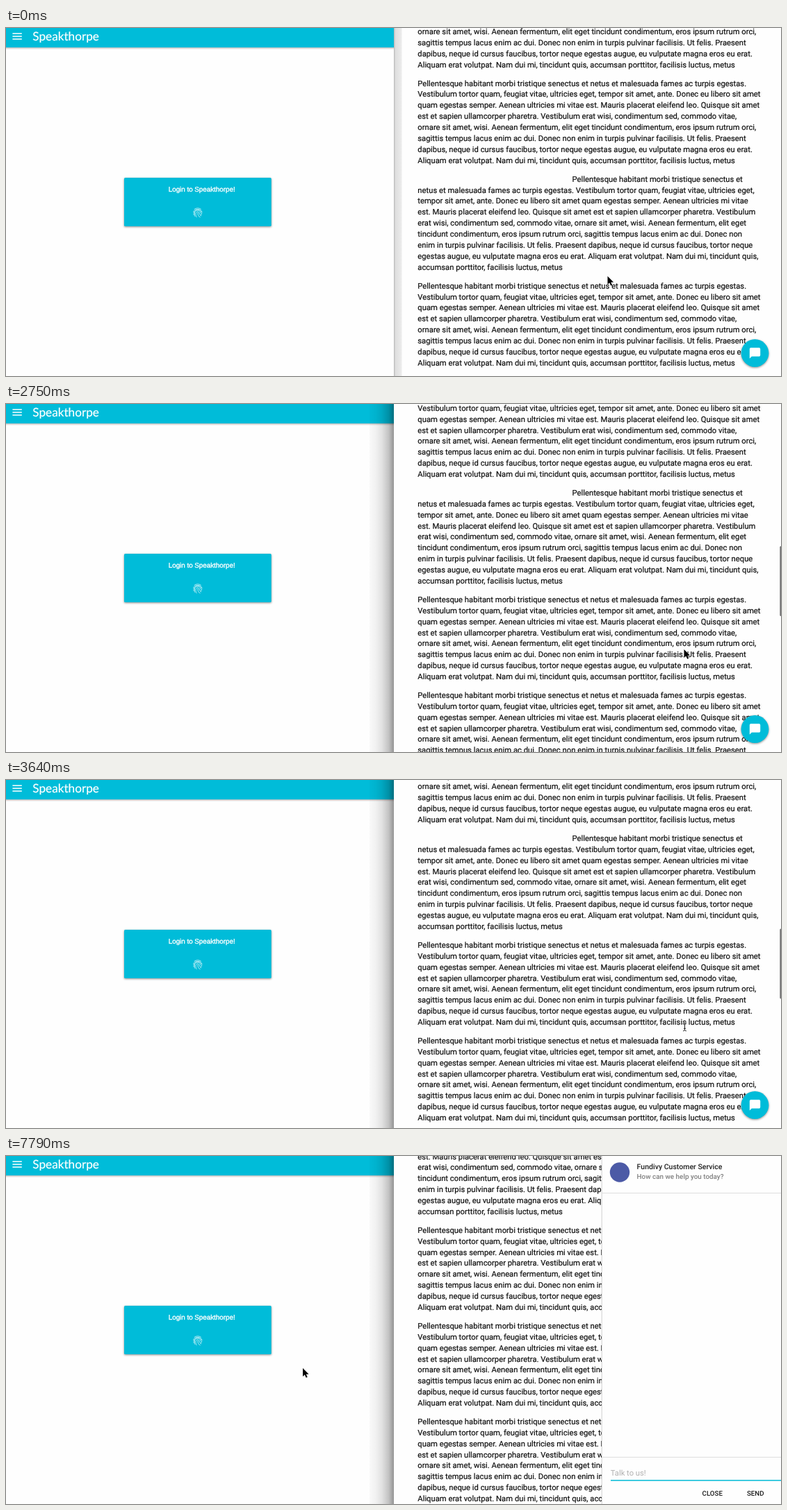
An HTML page that plays this animation: 1115x502 px, repeating every 8000 ms.

```html
<!DOCTYPE html>
<html lang="en">
<head>
<meta charset="utf-8">
<title>Support chat</title>
<style>
  html, body { margin: 0; width: 100%; height: 100%; overflow: hidden; background: #fefefe; }
  svg { display: block; width: 100%; height: 100%; text-rendering: geometricPrecision; }
  text { font-family: Roboto, sans-serif; white-space: pre; }
  .body { font-size: 11.27px; fill: #111; stroke: #111; stroke-width: .2px; }
  .action { font-size: 9.7px; font-weight: 500; fill: #1c1c1c; }
  .card { filter: drop-shadow(0 1.3px 1.7px rgba(0, 0, 0, .46)); }
</style>
</head>
<body>
<svg viewBox="0 0 1115 502" xmlns="http://www.w3.org/2000/svg">
  <defs>
    <linearGradient id="barShade" x2="0" y2="1">
      <stop stop-opacity=".26"/><stop offset="1" stop-opacity="0"/>
    </linearGradient>
    <linearGradient id="windowShade">
      <stop stop-opacity=".02"/><stop offset=".25" stop-opacity=".05"/>
      <stop offset=".5" stop-opacity=".11"/><stop offset=".78" stop-opacity=".23"/>
      <stop offset="1" stop-opacity=".42"/>
    </linearGradient>
    <linearGradient id="edgeShade">
      <stop stop-color="#b8b8b8"/><stop offset=".2" stop-color="#dedede"/>
      <stop offset="1" stop-color="#ececec"/>
    </linearGradient>
    <g id="plain" class="body"></g>
    <g id="indented" class="body"></g>
  </defs>

  <rect width="1115" height="502" fill="#fefefe"/>

  <!-- app window -->
  <rect width="558" height="28" fill="#00bcd9"/>
  <rect y="28" width="558" height="3" fill="url(#barShade)"/>
  <path d="M9.4 8h13.4M9.4 12h13.4M9.4 16h13.4" stroke="#fff" stroke-width="1.4"/>
  <text x="38.3" y="17.6" font-size="17.2" fill="#fff" stroke="#fff" stroke-width=".2" style="font-family:Lato,sans-serif">Speakthorpe</text>
  <rect class="card" x="170" y="216" width="211.7" height="70" rx="1.5" fill="#00bcd9"/>
  <text x="281.7" y="236" font-size="9.8" fill="#fff" stroke="#fff" stroke-width=".35" text-anchor="middle" style="font-family:'Liberation Sans',Arial,sans-serif">Login to Speakthorpe!</text>
  <g transform="translate(275.8 266.4)" fill="none" stroke="#fff" stroke-width=".8" stroke-linecap="round" opacity=".8">
    <path d="M-4.6-5.2Q0-8.2 4.6-5.2M-6.2-1C-5-6.6 5-6.6 6.2-1M-5.6 3.2C-7.4-5.4 6-6.6 5.8 1.4Q5.6 3 4.2 3"/>
    <path d="M-4 5.2C-6-2.8-2-3.6 0-3.5 2.6-3.4 4-1.6 4 .6M-1.8 6.4C-3.6 2-3-1.4 0-1.5 3-1.4 1.2 3.6 5 4.4M0 .2C0 3.6 1.4 5.8 3.4 6.4"/>
  </g>

  <rect id="edge" x="558" width="11.5" height="502" fill="url(#edgeShade)"/>
  <rect id="shade" x="523" width="35" height="502" fill="url(#windowShade)"/>

  <!-- page window -->
  <g id="page"></g>
  <rect id="thumb" x="1113.4" width="3" height="101" rx="1.5" fill="#6c6c6c"/>
  <g id="fab">
    <circle class="card" cx="1077.5" cy="469" r="19.9" fill="#00bcd9"/>
    <circle id="glow" cx="1077.5" cy="469" r="19.9" fill="#fff"/>
    <path transform="translate(1068.3 459.8) scale(.77)" fill="#fff" d="M20 2H4a2 2 0 0 0-2 2v18l4-4h14a2 2 0 0 0 2-2V4a2 2 0 0 0-2-2z"/>
  </g>

  <!-- chat drawer -->
  <g id="drawer">
    <rect x="856" width="2" height="502" fill="#000" opacity=".06"/>
    <rect x="857.5" width="280" height="502" fill="#fefefe"/>
    <path d="M857.5 0V502M858 53.5h280M858 434.5h280" stroke="#dedede"/>
    <circle cx="883" cy="23.5" r="14.2" fill="#4c5aa6"/>
    <text x="907.6" y="19.3" font-size="10.55" font-weight="500" fill="#222">Fundivy Customer Service</text>
    <text x="907.6" y="32.6" font-size="9.9" font-weight="500" fill="#808080">How can we help you today?</text>
    <text x="869.8" y="461.2" font-size="11.2" fill="#b0b0b0">Talk to us!</text>
    <path d="M870 468h252" stroke="#e0e0e0" stroke-width=".8"/>
    <path id="focus" stroke="#00bcd9" stroke-width="1.6"/>
    <text class="action" x="1001.6" y="489.5">CLOSE</text>
    <text class="action" x="1066" y="489.5">SEND</text>
  </g>

  <!-- pointers, hot spot at 0,0 -->
  <path id="arrow" d="M0 0V12L2.8 9.5 4.7 13.8 6.7 12.9 4.8 8.7H8.6Z" fill="#000" stroke="#fff" stroke-width="1" paint-order="stroke"/>
  <g id="beam" fill="none">
    <path d="M-2.4-6Q0-6 0-4.4Q0-6 2.4-6M0-4.6V4.6M-2.4 6Q0 6 0 4.4Q0 6 2.4 6M-1.4 2.4H1.4" stroke="#fff" stroke-width="2.2" opacity=".7"/>
    <path d="M-2.4-6Q0-6 0-4.4Q0-6 2.4-6M0-4.6V4.6M-2.4 6Q0 6 0 4.4Q0 6 2.4 6M-1.4 2.4H1.4" stroke="#222" stroke-width="1"/>
  </g>
  <path id="hand" d="M-1.3 1Q-1.2-.6 0-.6T1.3 1V5Q2.4 4 3.6 5.2 4.8 4.5 5.6 5.8 7.4 5.6 7.4 7.4V10Q7 12 6 13.2V15H-1V13.4Q-3 11.6-5 8.2-5.2 6.6-3.6 6.8L-1.3 9Z" fill="#fff" stroke="#111" stroke-width="1.1" stroke-linejoin="round"/>
</svg>
<script>
const LOOP = 8000, SCALE = 0.7935;
const LINE = 20 * SCALE, GAP = 14 * SCALE, LEFT = 592.3;
const BLOCK = 8 * LINE + GAP, INDENT = 280 * SCALE;
const $ = id => document.getElementById(id);
const NS = 'http://www.w3.org/2000/svg';

const plainLines = [
  'Pellentesque habitant morbi tristique senectus et netus et malesuada fames ac turpis egestas.',
  'Vestibulum tortor quam, feugiat vitae, ultricies eget, tempor sit amet, ante. Donec eu libero sit amet',
  'quam egestas semper. Aenean ultricies mi vitae est. Mauris placerat eleifend leo. Quisque sit amet',
  'est et sapien ullamcorper pharetra. Vestibulum erat wisi, condimentum sed, commodo vitae,',
  'ornare sit amet, wisi. Aenean fermentum, elit eget tincidunt condimentum, eros ipsum rutrum orci,',
  'sagittis tempus lacus enim ac dui. Donec non enim in turpis pulvinar facilisis. Ut felis. Praesent',
  'dapibus, neque id cursus faucibus, tortor neque egestas augue, eu vulputate magna eros eu erat.',
  'Aliquam erat volutpat. Nam dui mi, tincidunt quis, accumsan porttitor, facilisis luctus, metus'
];
const indentedLines = [
  'Pellentesque habitant morbi tristique senectus et',
  'netus et malesuada fames ac turpis egestas. Vestibulum tortor quam, feugiat vitae, ultricies eget,',
  'tempor sit amet, ante. Donec eu libero sit amet quam egestas semper. Aenean ultricies mi vitae',
  'est. Mauris placerat eleifend leo. Quisque sit amet est et sapien ullamcorper pharetra. Vestibulum',
  'erat wisi, condimentum sed, commodo vitae, ornare sit amet, wisi. Aenean fermentum, elit eget',
  'tincidunt condimentum, eros ipsum rutrum orci, sagittis tempus lacus enim ac dui. Donec non',
  'enim in turpis pulvinar facilisis. Ut felis. Praesent dapibus, neque id cursus faucibus, tortor neque',
  'egestas augue, eu vulputate magna eros eu erat. Aliquam erat volutpat. Nam dui mi, tincidunt quis,',
  'accumsan porttitor, facilisis luctus, metus'
];

function add(parent, name, attrs) {
  const el = document.createElementNS(NS, name);
  for (const key in attrs) el.setAttribute(key, attrs[key]);
  return parent.appendChild(el);
}

function fill(group, lines, indent) {
  lines.forEach((line, i) => {
    const x = LEFT + (i ? 0 : indent);
    add(group, 'text', { x, y: i * LINE + 3.9 }).textContent = line;
  });
}

fill($('plain'), plainLines, 0);
fill($('indented'), indentedLines, INDENT);
// The indented paragraph sits at the page's own zero.
for (let i = -4; i <= 5; i++) {
  const y = i * BLOCK + (i > 0 ? LINE : 0);
  add($('page'), 'use', { href: i ? '#plain' : '#indented', y });
}

// The screen refreshes in bursts: start, end, number of refreshes.
const bursts = [
  [940, 1130, 2], [1420, 1720, 3], [2010, 3050, 8], [3200, 3640, 4], [3940, 4380, 4],
  [4670, 5120, 4], [5560, 5860, 3], [6460, 7490, 8], [7640, 7790, 2]
];
// Refreshes fall on whole hundredths of a second.
const ticks = [0];
for (const [from, to, n] of bursts)
  for (let i = 0; i < n; i++) ticks.push(Math.floor((from + (to - from) * i / (n - 1)) / 10) * 10);

const scroll = [
  [0, 217.8], [1900, 217.8], [2300, 209.3], [2750, 128.1], [3050, 238.3],
  [3640, 84.1], [3790, 84.1], [4230, -47]
];
const pointer = [
  [0, 865.5, 358], [1300, 865.5, 358], [1420, 905, 347], [1570, 979, 338], [1720, 975.5, 354],
  [3500, 975.5, 354], [3640, 976.5, 356], [3940, 976.5, 356], [4380, 1077.3, 472.3],
  [5710, 1077.3, 472.3], [5860, 1078, 471], [6310, 1078, 471], [6900, 1028, 456],
  [7490, 1028, 456], [7640, 760, 390], [7790, 427, 306]
];

const clamp = v => Math.max(0, Math.min(1, v));
const easeOut = v => 1 - (1 - clamp(v)) ** 3;

function along(track, t) {
  const i = track.findIndex(key => key[0] > t);
  if (i < 0) return track[track.length - 1].slice(1);
  const a = track[i - 1], b = track[i], k = (t - a[0]) / (b[0] - a[0]);
  return a.slice(1).map((v, j) => v + (b[j + 1] - v) * k);
}

function pointerKind(t) {
  if (t >= 4380 && t < 5860) return 'hand';
  return (t >= 3640 && t < 4090) || (t >= 5860 && t < 7640) ? 'beam' : 'arrow';
}

const show = (id, on) => $(id).setAttribute('display', on ? 'inline' : 'none');
const move = (id, x, y) => $(id).setAttribute('transform', `translate(${x} ${y})`);

function draw(time) {
  const t = ticks.reduce((last, tick) => tick <= time + 0.5 ? tick : last, 0);

  show('edge', t < 940);
  $('shade').setAttribute('opacity', t < 940 ? 0 : t < 1130 ? 0.7 : 1);

  const [y] = along(scroll, t);
  move('page', 0, y);
  show('thumb', t > 2400);
  $('thumb').setAttribute('y', 181 + (238.3 - y) * 0.217);

  $('glow').setAttribute('opacity', 0.32 * easeOut((t - 4600) / 520));

  show('drawer', t >= 5700);
  move('drawer', t < 5860 ? 45 : 0, 0);
  const half = 126 * easeOut((t - 6900) / 590);
  $('focus').setAttribute('d', `M${996 - half} 468H${996 + half}`);

  const kind = pointerKind(t), [px, py] = along(pointer, t);
  for (const id of ['arrow', 'beam', 'hand']) show(id, id === kind);
  move(kind, px, py);
}

const start = performance.now();
function tick() {
  draw((performance.now() - start) % LOOP);
  requestAnimationFrame(tick);
}
tick();
</script>
</body>
</html>
```
